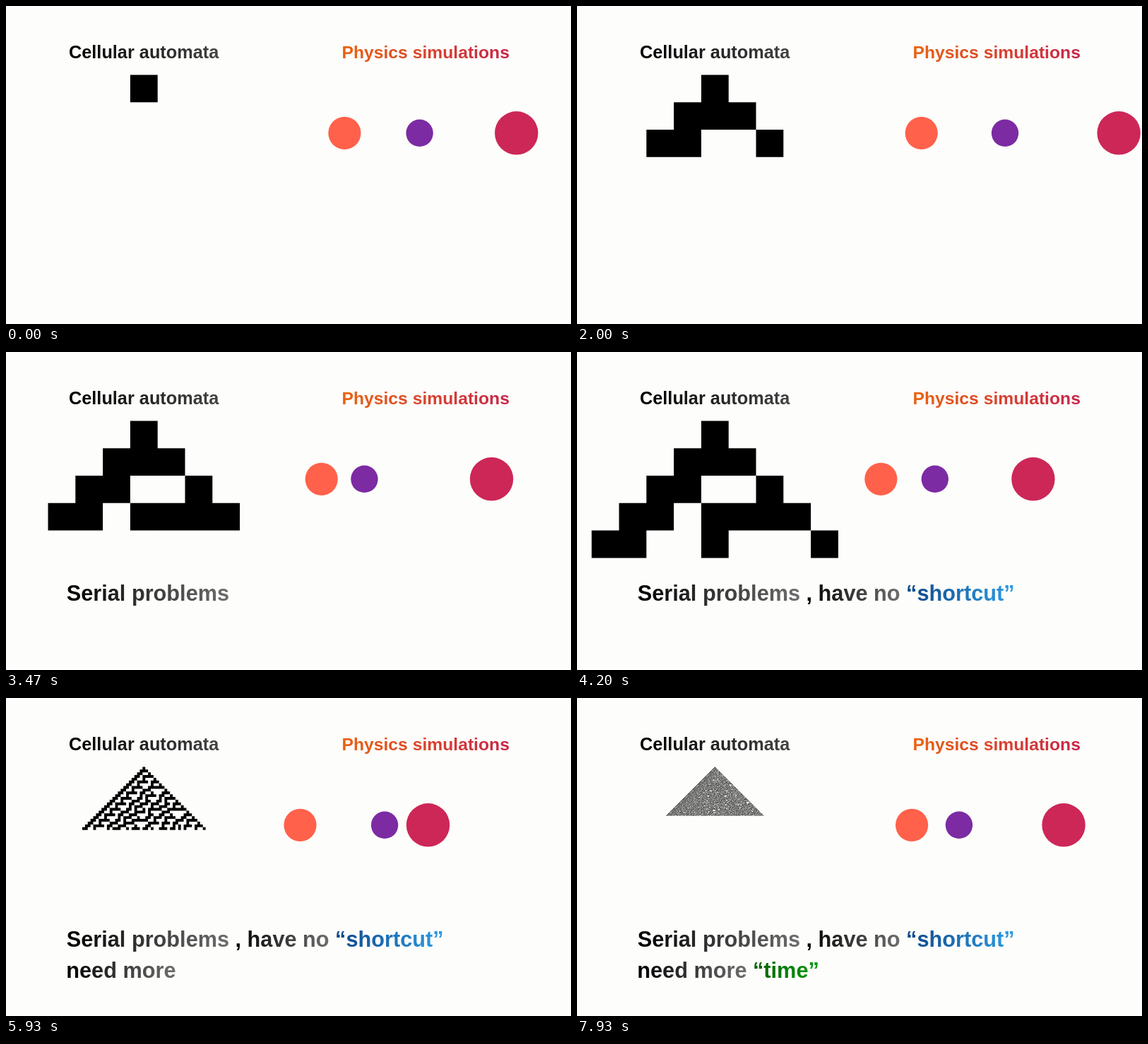
Write an HTML page with a canvas that moves like this. It is 800x450 px and loops after 8000 ms.

```html
<!DOCTYPE html>
<html lang="en">
<head>
<meta charset="utf-8">
<title>Serial problems</title>
<style>
  html, body { margin: 0; width: 100%; height: 100%; overflow: hidden; background: #fdfdfb; }
  canvas { display: block; }
</style>
</head>
<body>
<canvas id="stage" width="800" height="450"></canvas>
<script>
const ctx = document.getElementById('stage').getContext('2d');
const FPS = 15, FRAMES = 120;

const BLACK = ['#000', '#6e6e6e'];
const DARK = ['#000', '#444'];
const FIRE = ['#ea6310', '#c8254a'];
const BLUE = ['#0c4688', '#2f9de6'];
const GREEN = ['#066006', '#0a9c10'];

// Each line is a run of phrases; a phrase fades in at its own second
const lines = [
  { x: 89, y: 74, size: 25.3, phrases: [['Cellular automata', DARK, -1]] },
  { x: 475.5, y: 74, size: 24.7, phrases: [['Physics simulations', FIRE, -1]] },
  { x: 85.8, y: 352, size: 30.7, phrases: [
    ['Serial problems', BLACK, 2.1], [', have no', BLACK, 3.6], ['“shortcut”', BLUE, 3.8]] },
  { x: 85.3, y: 396, size: 30.7, phrases: [['need more', BLACK, 5.6], ['“time”', GREEN, 6]] }
];

function drawLine({ x, y, size, phrases }, t) {
  ctx.font = `bold ${size}px "Liberation Sans", Arial, sans-serif`;
  const space = ctx.measureText(' ').width;
  for (const [text, [from, to], start] of phrases) {
    const { width } = ctx.measureText(text);
    const gradient = ctx.createLinearGradient(x, 0, x + width, 0);
    gradient.addColorStop(0, from);
    gradient.addColorStop(1, to);
    ctx.globalAlpha = Math.min(1, Math.max(0, (t - start) / 0.3));
    ctx.fillStyle = gradient;
    ctx.fillText(text, x, y);
    x += width + space;
  }
  ctx.globalAlpha = 1;
}

// Elastic balls in a row between two walls, with their state at START seconds
const START = 4.2;
const wall = x => ({ x, v: 0, r: 0, mass: 1e9 });
const bodies = [
  wall(391.5),
  { x: 430.35, v: 65.3, r: 23.1, mass: 0.457, color: '#ff614b' },
  { x: 506.8, v: -0.9, r: 19.2, mass: 0.2575, color: '#7c2ba3' },
  { x: 645.9, v: -56.8, r: 30.7, mass: 1, color: '#cc2757' },
  wall(799.7)
];

function collide(a, b) {
  const center = (a.mass * a.v + b.mass * b.v) / (a.mass + b.mass);
  a.v = 2 * center - a.v;
  b.v = 2 * center - b.v;
}

// Elastic motion is reversible, so earlier times run with velocities negated
function bodiesAt(t) {
  const direction = t < START ? -1 : 1;
  const state = bodies.map(b => ({ ...b, v: b.v * direction }));
  let remaining = Math.abs(t - START);
  for (;;) {
    let step = remaining, hit = null;
    for (let i = 1; i < state.length; i++) {
      const a = state[i - 1], b = state[i], closing = a.v - b.v;
      const wait = (b.x - a.x - a.r - b.r) / closing;
      if (closing > 1e-6 && wait < step) {
        step = Math.max(0, wait);
        hit = [a, b];
      }
    }
    for (const b of state) b.x += b.v * step;
    if (!hit) return state;
    remaining -= step;
    collide(...hit);
  }
}

function drawBalls(t) {
  for (const { x, r, color } of bodiesAt(t)) {
    if (!color) continue;
    ctx.fillStyle = color;
    ctx.beginPath();
    ctx.arc(x, 179.8, r, 0, 2 * Math.PI);
    ctx.fill();
  }
}

// Rule 30 grown from a single cell
const ROWS = 200, MIDDLE = ROWS;
const rows = [Array.from({ length: 2 * ROWS + 1 }, (_, x) => +(x === MIDDLE))];
while (rows.length < ROWS) {
  const last = rows[rows.length - 1];
  rows.push(last.map((on, x) => (last[x - 1] || 0) ^ (on | (last[x + 1] || 0))));
}

function drawAutomaton(t) {
  const u = t + 0.015;
  // Each zoom makes cells ten times smaller and growth faster
  const [count, size] = u < 5 ? [1 + u, 38.8]
    : u < 7.3 ? [5 + (u - 5) * 20, 3.88]
    : [50 + (u - 7.3) * 200, 0.388];
  ctx.fillStyle = '#000';
  ctx.beginPath();
  rows.slice(0, Math.floor(count)).forEach((row, y) => {
    for (let x = MIDDLE - y; x <= MIDDLE + y; x++) {
      if (row[x]) ctx.rect(195.3 + (x - MIDDLE - 0.5) * size, 97.4 + y * size, size, size);
    }
  });
  ctx.fill();
}

function render(t) {
  ctx.fillStyle = '#fdfdfb';
  ctx.fillRect(0, 0, 800, 450);
  drawAutomaton(t);
  drawBalls(t);
  lines.forEach(line => drawLine(line, t));
}

const origin = performance.now();
let shown = -1;
function tick() {
  const elapsed = performance.now() - origin;
  const frame = Math.floor((elapsed + 5) * FPS / 1000) % FRAMES;
  if (frame !== shown) render((shown = frame) / FPS);
  requestAnimationFrame(tick);
}
tick();
</script>
</body>
</html>
```
